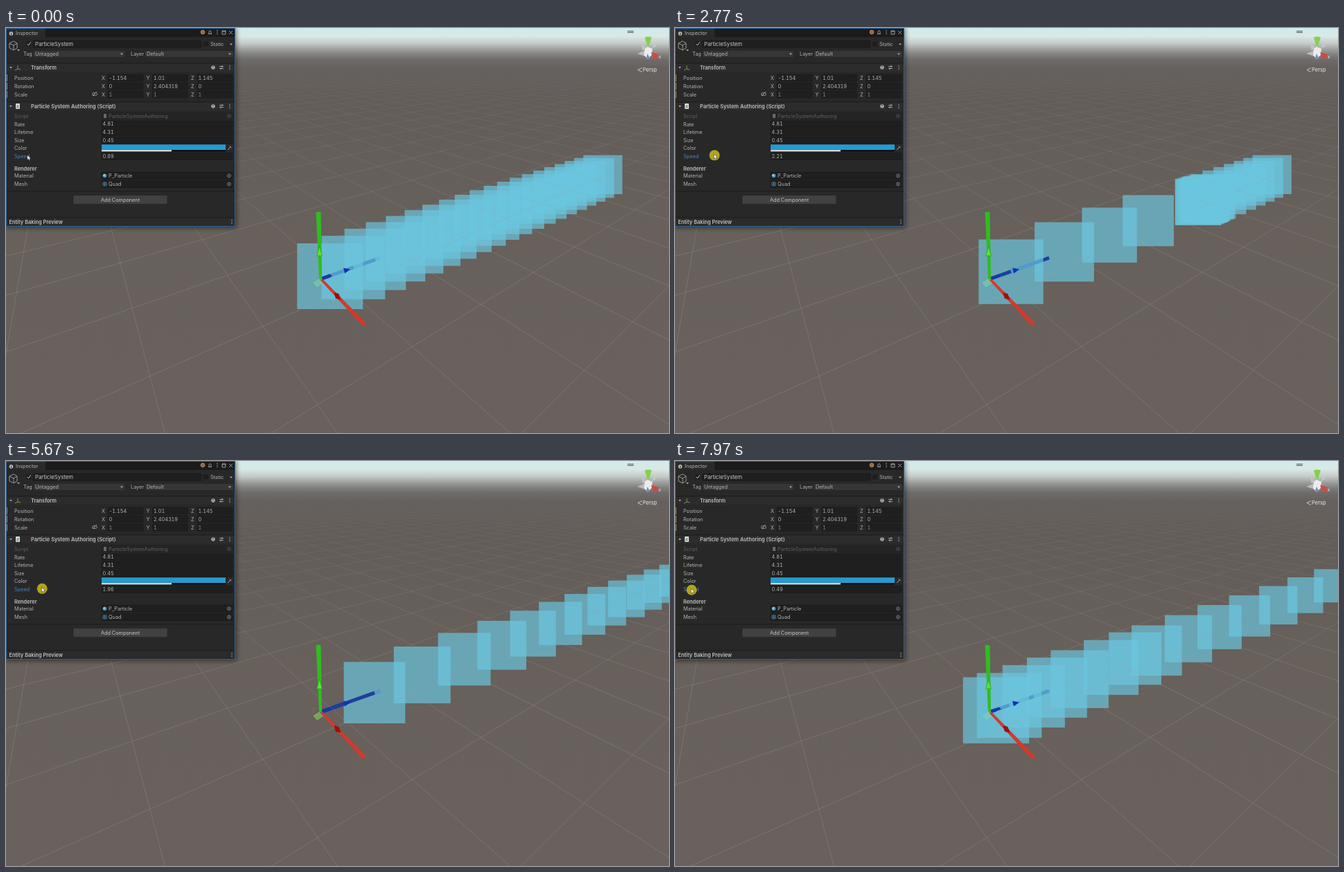
Recreate the animation shown at these times as an HTML page. Size 957 by 585 pixels, loop 8000 ms.

```html
<!DOCTYPE html>
<html lang="en">
<head>
<meta charset="utf-8">
<title>Particle emitter</title>
<style>
html, body { margin: 0; width: 100%; height: 100%; overflow: hidden; background: #68605c; }
svg { display: block; width: 957px; height: 585px; }
text { font: 7.3px Inter, Roboto, sans-serif; font-variant-numeric: tabular-nums; fill: #b2b2b2; white-space: pre; }
.head { font-size: 7.4px; font-weight: 600; fill: #c0c0c0; }
</style>
</head>
<body>
<svg id="stage" viewBox="0 0 957 585" xmlns="http://www.w3.org/2000/svg">
  <defs>
    <linearGradient id="ground" x2="0" y2="1">
      <stop offset="0" stop-color="#cdeced"/>
      <stop offset=".02" stop-color="#d9e8e6"/>
      <stop offset=".038" stop-color="#c5cbc8"/>
      <stop offset=".052" stop-color="#a0a29f"/>
      <stop offset=".065" stop-color="#82827f"/>
      <stop offset=".078" stop-color="#6f6c6a"/>
      <stop offset=".1" stop-color="#65605d"/>
      <stop offset=".18" stop-color="#635d59"/>
      <stop offset=".5" stop-color="#67605b"/>
      <stop offset="1" stop-color="#69615d"/>
    </linearGradient>
    <linearGradient id="fade" gradientUnits="userSpaceOnUse" x1="0" y1="45" x2="0" y2="330">
      <stop offset="0" stop-color="#fff" stop-opacity="0"/>
      <stop offset=".25" stop-color="#fff" stop-opacity=".35"/>
      <stop offset="1" stop-color="#fff"/>
    </linearGradient>
    <mask id="far" maskUnits="userSpaceOnUse" x="0" y="0" width="957" height="585">
      <rect width="957" height="585" fill="url(#fade)"/>
    </mask>
    <filter id="soft" x="-10%" y="-10%" width="120%" height="120%"><feGaussianBlur stdDeviation="3"/></filter>
  </defs>
  <rect width="957" height="585" fill="url(#ground)"/>
  <path d="M444 368l8-5 6 5-9 6z" fill="#6c8a4e" stroke="#83b85c" stroke-width=".8"/>
  <path d="M443 364v-7h10" fill="none" stroke="#a0605a" stroke-width=".7"/>
  <line x1="456" y1="362" x2="540" y2="332" stroke="#1f3f9c" stroke-width="5"/>
  <g id="particles"></g>
  <g mask="url(#far)"><path id="grid" fill="none" stroke="#a39d99" stroke-opacity=".4" stroke-width=".8"/></g>
  <g id="handles">
    <path d="M444 368l8-5 6 5-9 6z" fill="#8fe08c" opacity=".3"/>
    <path d="M487 346.500l10 2-8 6z" fill="#1233ad"/>
    <path d="M456 359.500l12-4 3 3-13 5z" fill="#173a9f"/>
    <path d="M453.500 364l61 66q4 0 5-4l-62.500-63.500z" fill="#cf3b2d"/>
    <path d="M474 382.500l6 1.500 3 8-7-1.500z" fill="#a50c0c" stroke="#6d1712" stroke-width=".5"/>
    <path d="M447.500 266.500q3.500-2 7 0l1.500 96h-4z" fill="#2fbd1f"/>
    <path d="M452.500 315.500l4 13.500h-8z" fill="#59e32d" stroke="#259414" stroke-width=".6"/>
  </g>
  <g id="compass">
    <path d="M897 4.500h9M897 6.500h9" stroke="#555" stroke-width="1"/>
    <path d="M922 13.500q5-2 10 0l-4 13h-2z" fill="#86cf4c"/>
    <path d="M917 23l7 5-5 5zM936 20l3 6-7 4zM911 37l13-5-1 9z" fill="#c9cbcb" opacity=".75"/>
    <path d="M926 27l7 3-1 9-6 6-5-6 1-9z" fill="#ececec"/>
    <path d="M931 35l11 3-2 6-5 1z" fill="#cd4b42"/>
    <path d="M926 37l4 8-6-1z" fill="#7086bd"/>
    <text x="942" y="44" style="fill:#eee;font-size:6px">x</text>
    <path d="M918 57.500l-6 3 6 3" fill="none" stroke="#e3e3e3" stroke-width=".8"/>
    <text x="919" y="63" style="fill:#e6e6e6;font-size:7.600px">Persp</text>
  </g>
  <rect x="0" y="0" width="333" height="289" fill="#000" opacity=".45" filter="url(#soft)"/>
  <g id="panel"></g>
  <g id="mouse">
    <circle id="press" r="7.500" fill="#b9ab19" opacity=".95"/>
    <path d="M-1-2v8l2-1.800 1.500 3 1.400-.6-1.400-3h2.700z" transform="scale(.85)" fill="#fff" stroke="#222" stroke-width=".6"/>
  </g>
</svg>
<script>
const $ = id => document.getElementById(id);
const LOOP = 8000;

// Emitter: particles show up on the step after their birth and live a little under the nominal time.
const RATE = 4.81, FIRST = -.063, YOUNGEST = .025, OLDEST = 4.09;

const CLOCK = [[0, 0], [1.02, 1.354], [2.77, 3.538], [4.72, 6.176], [5.67, 7.413], [6.92, 9.057], [8, 10.44]];

// Emission speed as the label is dragged, by simulation time.
const SPEED = [[.77, .89], [1.18, 1.01], [1.36, 1.01], [1.6, 1.21], [1.81, 1.35], [2.015, 1.52],
  [2.22, 1.74], [2.43, 2.04], [2.64, 2.47], [2.85, 2.2], [3.2, 2.21], [6.6, 2.21], [7.21, 2.1],
  [7.413, 1.96], [8.877, 1.07], [9.057, 1.04], [9.29, .98], [9.5, .84], [9.71, .78], [9.92, .69],
  [10.12, .49]];

function along(points, x) {
  if (x <= points[0][0]) return points[0][1];
  for (let i = 1; i < points.length; i++) {
    const [x0, y0] = points[i - 1], [x1, y1] = points[i];
    if (x <= x1) return y0 + (y1 - y0) * (x - x0) / (x1 - x0);
  }
  return points[points.length - 1][1];
}

// Inspector panel
const rect = (x, y, w, h, fill, more = '') => `<rect x="${x}" y="${y}" width="${w}" height="${h}" fill="${fill}" ${more}/>`;
const text = (x, y, s, more = '') => `<text x="${x}" y="${y}" ${more}>${s}</text>`;
const path = (d, stroke = '#aaa', fill = 'none') => `<path d="${d}" stroke="${stroke}" fill="${fill}" stroke-width=".9"/>`;
const dots = (x, y) => [-2.5, 0, 2.5].map(d => rect(x - .6, y + d - .6, 1.2, 1.2, '#b0b0b0')).join('');
const field = (x, y, w) => rect(x, y - 5, w, 10, '#1f1f1f', 'rx="1.5" stroke="#191919" stroke-width=".6"');
const arrow = (x, y) => `<path d="M${x - 2} ${y - 1}h4l-2 2.500z" fill="#aaa"/>`;
const ring = (x, y) => `<circle cx="${x}" cy="${y}" r="2.500" stroke="#8e8e8e" stroke-width=".8" fill="none"/><circle cx="${x}" cy="${y}" r=".9" fill="#8e8e8e"/>`;

function section(y, title) {
  return rect(1, y - 6, 329, 12, '#2c2c2c') + rect(1, y - 6.5, 329, .8, '#171717')
    + arrow(7, y) + text(36, y + 2.7, title, 'class="head"')
    + `<circle cx="299" cy="${y}" r="2.800" fill="#aaa"/>` + text(297.6, y + 2, '?', 'style="fill:#222;font-size:5px"')
    + path(`M308 ${y - 1.5}h6M308 ${y + 1.5}h6M312 ${y - 3}v3M310 ${y}v3`) + dots(323, y);
}

function buildPanel() {
  let s = rect(0, 0, 331, 286.5, '#282828') + rect(0, 0, 331, 13, '#1b1b1b') + rect(1, 1, 56, 12, '#2a2a2a')
    + rect(1, 0, 56, 1.2, '#2f6ea9')
    + '<circle cx="7.500" cy="8" r="2.800" fill="#bbb"/>' + rect(7, 7, 1, 3, '#222') + text(14, 10.3, 'Inspector')
    + '<circle cx="284" cy="6" r="2.800" fill="#8a6a4e" stroke="#c08a5c"/>'
    + path('M292 8.500h5M293 8v-3q1.500-3 3 0v3') + dots(305, 6) + path('M312 4h5v5h-5zM312 5h5') + path('M322 4l5 5M327 4l-5 5');

  s += path('M5 22l6-3 5 3v7l-5 3-6-3zM5 22l6 3 5-3M11 25v7', '#a5a5a5') + arrow(18, 32)
    + rect(29, 19.5, 7, 7, '#1d1d1d', 'rx="1"') + path('M30.500 23l2 2 3-4.500', '#ddd')
    + field(39, 23.3, 243) + text(42, 26.2, 'ParticleSystem', 'style="font-size:7.800px;fill:#c8c8c8"')
    + rect(285, 19.5, 7, 7, '#1d1d1d', 'rx="1"') + text(295, 26, 'Static') + arrow(325, 23.5)
    + text(25, 40, 'Tag') + rect(40, 33, 131, 9, '#363636', 'rx="1.500"') + text(42, 39.9, 'Untagged') + arrow(167, 37.5)
    + text(180, 40, 'Layer') + rect(201, 33, 127, 9, '#363636', 'rx="1.500"') + text(203, 39.9, 'Default') + arrow(323, 37.5);

  s += section(57, 'Transform') + path('M17 54v5l-4 2M17 59l4 1', '#7ca35a') + path('M17 59l4 1', '#b85b4c');
  [['Position', '-1.154', '1.01', '1.145'], ['Rotation', '0', '2.404319', '0'], ['Scale', '1', '1', '1']].forEach((row, i) => {
    const y = 72 + i * 12;
    s += text(12, y + 2.6, row[0]) + rect(0, y - 5, 2, 10, '#8a8160');
    ['X', 'Y', 'Z'].forEach((axis, j) => {
      const x = 138 + j * 64.5;
      s += text(x, y + 2.6, axis) + field(x + 9, y, 51) + text(x + 10.5, y + 2.6, row[j + 1], i > 1 ? 'opacity=".75"' : '');
    });
  });
  s += path('M128 94a2 2 0 1 0 0 3M128 94a2 2 0 1 1 0 3M125 98l6-6');

  s += section(113, 'Particle System Authoring (Script)') + rect(14, 109, 6, 8, '#d6d6d6', 'rx="1"') + text(15, 115.5, '#', 'style="fill:#377a43;font-size:6px"');
  s += `<g opacity=".4">${text(12, 129.6, 'Script')}${field(138, 127, 189)}${rect(141, 124, 4, 6, '#ccc')}${text(148, 129.6, 'ParticleSystemAuthoring')}${ring(322, 127)}</g>`;
  [['Rate', '4.81'], ['Lifetime', '4.31'], ['Size', '0.45']].forEach(([name, value], i) => {
    const y = 139 + i * 11.6;
    s += text(12, y + 2.6, name) + field(138, y, 189) + text(139.5, y + 2.4, value);
  });
  s += text(12, 176.4, 'Color') + rect(138, 168.3, 179, 8.2, '#249bcf') + rect(138, 176.3, 179, 2, '#050505') + rect(138, 176.3, 101, 2, '#f4f4f4')
    + path('M320 176l4-4', '#bbb') + path('M323 170.500l2.500 2.500', '#ccc')
    + text(12, 188, 'Speed', 'style="fill:#4a83c3"') + field(138, 185.3, 189) + text(139.5, 188, '', 'id="speed"');

  s += text(12, 205.8, 'Renderer', 'class="head"');
  [['Material', 'P_Particle', 213.3], ['Mesh', 'Quad', 225.4]].forEach(([name, value, y], i) => {
    s += text(12, y + 2.7, name) + field(138, y, 189) + text(148, y + 2.6, value) + ring(322, y)
      + (i ? path(`M140 ${y - 2.5}h5v5h-5zM140 ${y}h5M142.500 ${y - 2.5}v5`, '#4a86a8')
           : `<circle cx="142.500" cy="${y}" r="2.800" fill="#4b9fc4"/><circle cx="141.700" cy="${y - .8}" r="1.100" fill="#d7edf4"/>`);
  });
  s += rect(1, 235.5, 329, .8, '#191919') + rect(97, 241.5, 136, 13, '#414141', 'rx="1.500" stroke="#222" stroke-width=".6"')
    + text(165, 250.8, 'Add Component', 'text-anchor="middle" style="fill:#c6c6c6"')
    + rect(1, 274, 329, 12, '#2b2b2b') + rect(1, 273.5, 329, .8, '#171717') + text(4.5, 283, 'Entity Baking Preview', 'class="head"') + dots(326, 280)
    + rect(.5, .5, 330, 286, 'none', 'stroke="#2b659b"');
  $('panel').innerHTML = s;
}

// Ground grid: unit cells seen by a camera 2.445 above the floor, pitched down 29 degrees.
function view(x, z) {
  const dx = x - .472, dz = z - .167;
  const fwd = .568 * dz - .823 * dx;
  return [.568 * dx + .823 * dz, 2.138 - .4848 * fwd, 1.185 + .8746 * fwd];
}

function segment(a, b) {
  const near = .15;
  if (a[2] < near && b[2] < near) return '';
  const clip = (p, q) => {
    if (p[2] >= near) return p;
    const k = (near - p[2]) / (q[2] - p[2]);
    return p.map((v, i) => v + (q[i] - v) * k);
  };
  const put = p => (478.5 + 506 * p[0] / p[2]).toFixed(1) + ' ' + (292.5 + 506 * p[1] / p[2]).toFixed(1);
  return 'M' + put(clip(a, b)) + 'L' + put(clip(b, a));
}

function buildGrid() {
  let d = '';
  for (let i = -40; i <= 40; i++) {
    d += segment(view(i, -60), view(i, 60)) + segment(view(-60, i), view(60, i));
  }
  $('grid').setAttribute('d', d);
}

// Each particle hides only the part of the blue axis that lies behind it.
const pool = [];
const set = (el, attrs) => { for (const k in attrs) el.setAttribute(k, attrs[k]); };

function buildPool() {
  const add = (tag, attrs) => {
    const el = document.createElementNS('http://www.w3.org/2000/svg', tag);
    set(el, attrs);
    return $('particles').appendChild(el);
  };
  for (let i = 0; i < 22; i++) {
    pool.push({
      quad: add('rect', { fill: '#6ac7e0', 'fill-opacity': .68 }),
      axis: add('line', { x1: 456, y1: 362, stroke: '#1f3f9c', 'stroke-width': 5 })
    });
  }
}

function place(slot, z) {
  const depth = 5.063 + z, size = 486.5 / depth;
  const left = 1435 - 5196 / depth;
  const cx = left + size / 2, cy = 364 - (cx - 453) * .3725;
  set(slot.quad, { x: left, y: cy - size / 2, width: size, height: size });
  const end = Math.max(456, Math.min(540, cx));
  set(slot.axis, { x2: end, y2: 362 - (end - 456) * 30 / 84 });
}

function draw(ms) {
  const now = along(CLOCK, ms / 1000);
  const newest = Math.floor((now - FIRST) * RATE);
  const live = [];
  for (let n = newest; n > newest - 22; n--) {
    const born = FIRST + n / RATE, age = now - born;
    if (age >= YOUNGEST && age <= OLDEST) live.push(age * along(SPEED, born));
  }
  live.sort((a, b) => b - a);
  pool.forEach((slot, i) => {
    const shown = i < live.length;
    slot.quad.style.display = slot.axis.style.display = shown ? 'inline' : 'none';
    if (shown) place(slot, live[i]);
  });

  const speed = along(SPEED, now);
  $('speed').textContent = speed.toFixed(2);
  const x = 24 + (speed - .49) * 19.2;
  const y = along([[0, 185.5], [.8, 184], [6.5, 183.7], [9.06, 185.5], [10.4, 186.2]], now);
  $('mouse').setAttribute('transform', `translate(${x.toFixed(2)} ${y.toFixed(2)})`);
  $('press').style.display = ms < 500 ? 'none' : 'inline';
}

buildPanel();
buildGrid();
buildPool();
const start = performance.now();
function tick() {
  draw((performance.now() - start) % LOOP);
  requestAnimationFrame(tick);
}
tick();
</script>
</body>
</html>
```
